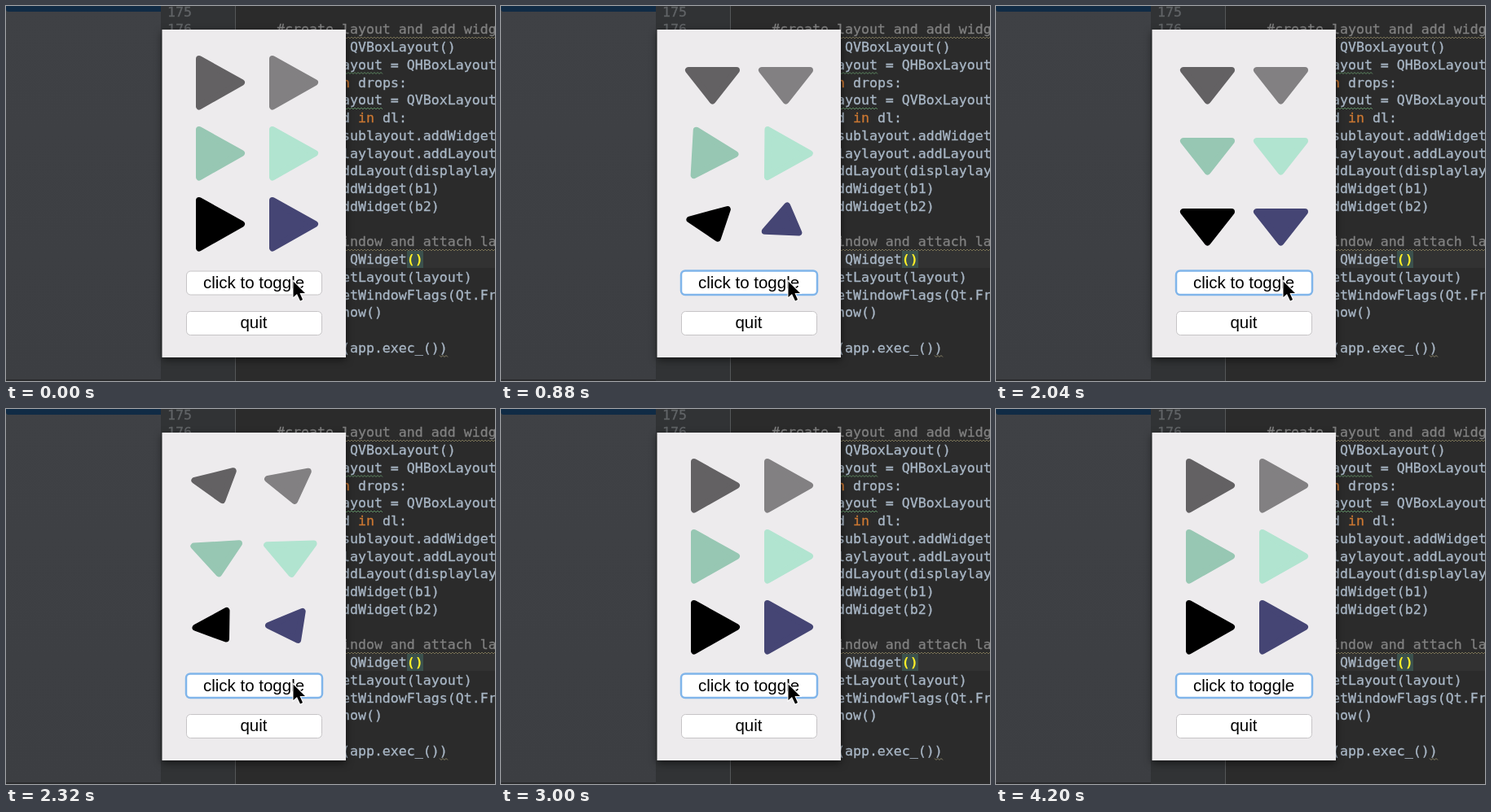
Write an HTML page that moves like this. It is 600 px wide and 461 px high and loops after 4240 ms.

```html
<!DOCTYPE html>
<html lang="en">
<head>
<meta charset="utf-8">
<title>Toggle drops</title>
<style>
  html, body { margin: 0; height: 100%; overflow: hidden; background: #2b2b2b; }
  svg { display: block; width: 600px; height: 461px; }
  .code { font: 16.6px "DejaVu Sans Mono", monospace; }
  .code text { fill: #a9b7c6; stroke: #a9b7c6; stroke-width: .3; white-space: pre; }
  .code .key { fill: #cc7832; stroke: #cc7832; }
  .code .note { fill: #808080; stroke: #808080; }
  .code .pair { fill: #ffef28; stroke: none; font-weight: bold; }
  .code .num { fill: #606366; stroke: #606366; }
  .label { font: 20.5px "Liberation Sans", Arial, sans-serif; text-anchor: middle; }
  .wave { fill: none; stroke-width: 1; }
  .shade { filter: drop-shadow(0 3px 5px rgba(0, 0, 0, .55)); }
</style>
</head>
<body>
<svg viewBox="0 0 600 461">
  <defs>
    <linearGradient id="side" x2="0" y2="1">
      <stop stop-color="#3f4145"/><stop offset="1" stop-color="#3c3e42"/>
    </linearGradient>
  </defs>
  <rect width="600" height="461" fill="#2b2b2b"/>
  <rect x="190" width="91" height="461" fill="#313335"/>
  <rect x="282" y="301" width="318" height="21" fill="#323232"/>
  <rect x="492" y="301" width="20" height="21" fill="#3b514d"/>
  <rect x="281" width="1" height="461" fill="#555759"/>
  <rect width="190" height="461" fill="url(#side)"/>
  <path d="M0 0H190V7H3Q0 7 0 4Z" fill="#102b45"/>
  <rect y="459" width="190" height="2" fill="#2b2c2e"/>
  <g id="code" class="code">
    <text x="198" y="13" class="num">175</text>
    <text x="198" y="34" class="num">176</text>
  </g>
  <rect class="shade" x="191.5" y="29" width="225.5" height="403" fill="#edebed"/>
  <g id="drops" stroke-width="8" stroke-linejoin="round"></g>
  <g fill="#fff" stroke="#c6c4c6">
    <rect x="221.5" y="326" width="166" height="29" rx="5"/>
    <rect x="221.5" y="375.5" width="166" height="29" rx="5"/>
  </g>
  <rect id="ring" x="221" y="325.5" width="167" height="29.5" rx="5" fill="#fff" stroke="#80b5ea" stroke-width="2.5"/>
  <text class="label" x="304" y="347">click to toggle</text>
  <text class="label" x="304" y="396">quit</text>
  <path id="cursor" d="M352.500 338.500V358L357 354L361 362.500L364 361L360.500 353H367Z" stroke="#fff" stroke-width="2" paint-order="stroke"/>
</svg>
<script>
const $ = id => document.getElementById(id);

function add(parent, tag, attrs) {
  const el = document.createElementNS("http://www.w3.org/2000/svg", tag);
  for (const k in attrs) el.setAttribute(k, attrs[k]);
  return parent.appendChild(el);
}

// Editor behind the window
const lines = `#create layout and add widgets
layout = QVBoxLayout()
displaylayout = QHBoxLayout()
for dl in drops:
    sublayout = QVBoxLayout()
    for d in dl:
        sublayout.addWidget(d)
    displaylayout.addLayout(sublayout)
layout.addLayout(displaylayout)
layout.addWidget(b1)
layout.addWidget(b2)

#build window and attach layout
window = QWidget()
window.setLayout(layout)
window.setWindowFlags(Qt.FramelessWindowHint)
window.show()

sys.exit(app.exec_())`.split("\n");

lines.forEach((line, row) => {
  const text = add($("code"), "text", { x: 332, y: 34.3 + row * 21.75 });
  if (line[0] == "#") text.setAttribute("class", "note");
  for (const part of line.split(/\b(for|in)\b/)) {
    const span = add(text, "tspan", /^(for|in)$/.test(part) ? { class: "key" } : {});
    span.textContent = part;
  }
  if (row == 13) {
    text.lastChild.textContent = line.slice(0, -2);
    add(text, "tspan", { class: "pair" }).textContent = "()";
  }
});

function wave(row, from, to, stroke) {
  const y = 38 + row * 21.75;
  let d = "";
  for (let x = 332 + from * 10, i = 0; x <= 332 + to * 10; x += 2, i++)
    d += (i ? "L" : "M") + x + " " + (y + (i % 2) * 2);
  add($("code"), "path", { class: "wave", d, stroke });
}
wave(0, 0, 27, "#787155");
wave(2, 0, 13, "#5d8a62");
wave(4, 4, 13, "#5d8a62");
wave(12, 0, 27, "#787155");
wave(18, 20, 21, "#8a8468");

// Drops: each corner slides straight from its closed to its open place
const closed = [[237, 65], [289, 94], [237, 123.5]];
const open = [[289, 79], [259.5, 116.5], [230, 79]];

const linear = u => u;
const inQuint = u => u ** 5;
const outCubic = u => 1 - (1 - u) ** 3;
const inOutQuad = u => u < .5 ? 2 * u * u : 1 - 2 * (1 - u) ** 2;
const inOutSine = u => (1 - Math.cos(Math.PI * u)) / 2;

const LOOP = 4240, OPEN = 370, CLOSE = 2242, LEAVE = 3080;

// colour, opening ease and time, closing ease and time
const drops = [
  ["#636163", linear, 400, linear, 400],
  ["#828082", linear, 500, linear, 500],
  ["#97c7b3", inQuint, 920, inOutSine, 510],
  ["#b1e4d0", inQuint, 1320, inOutSine, 740],
  ["#000000", inOutQuad, 760, outCubic, 580],
  ["#454574", inOutQuad, 1060, outCubic, 720]
].map(([color, ...motion], i) => ({
  motion,
  el: add($("drops"), "path", {
    fill: color, stroke: color,
    transform: `translate(${i % 2 * 90} ${(i >> 1) * 87})`
  })
}));

const ramp = (t, start, time) => Math.min(1, Math.max(0, (t - start) / time));

function draw(now) {
  const t = now % LOOP;
  for (const { el, motion: [easeIn, timeIn, easeOut, timeOut] } of drops) {
    const p = easeIn(ramp(t, OPEN, timeIn)) - easeOut(ramp(t, CLOSE, timeOut));
    const points = closed.map((c, i) => c.map((v, k) => v + (open[i][k] - v) * p));
    el.setAttribute("d", "M" + points.join("L") + "Z");
  }
  $("ring").style.display = t < OPEN ? "none" : "";
  $("cursor").style.display = t < LEAVE ? "" : "none";
}

const began = performance.now();
(function tick() {
  draw(performance.now() - began);
  requestAnimationFrame(tick);
})();
</script>
</body>
</html>
```
